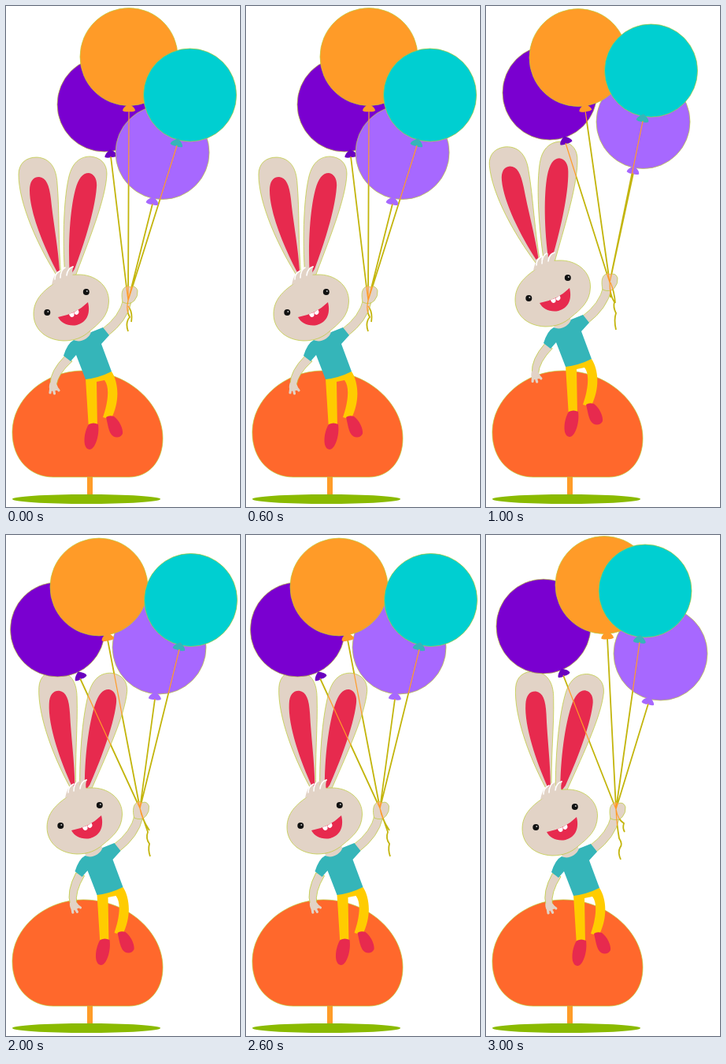
Write an HTML page that moves like this. It is 297 px wide and 636 px high and loops after 4000 ms.

```html
<!DOCTYPE html>
<html lang="en">
<head>
<meta charset="utf-8">
<title>Rabbit with balloons</title>
<style>
  html, body { margin: 0; width: 100%; height: 100%; overflow: hidden; background: #fff; }
  svg { display: block; width: 100%; height: 100%; }
  .pose { opacity: 0; animation: show 4s step-end infinite; }
  @keyframes show { 0% { opacity: 1; } 25%, 100% { opacity: 0; } }
  .skin { fill: #e2d3c6; }
  .red { fill: #e72a4e; }
  .shirt { fill: #35b5b9; }
  .pants { fill: #ffcc00; }
  .rim { stroke: #bccb35; stroke-width: .7; }
  .fingers { fill: none; stroke: #e2d3c6; stroke-width: 3.2; stroke-linecap: round; }
  .hair { fill: none; stroke: #fff; stroke-width: 1.6; stroke-linecap: round; }
  .cord { fill: none; stroke: #c3b50c; stroke-width: 1.8; }
  .thin { fill: none; stroke: #ff9b28; stroke-width: 1.2; }
</style>
</head>
<body>
<svg viewBox="0 0 297 636" preserveAspectRatio="none">
  <defs>
    <g id="arm">
      <path class="skin rim" d="M75 444Q56 463 56 480L64 482Q66 467 84 451Z"/>
      <path class="skin" d="M56 478L64 480Q67 484 65 488L57 489Q53 485 56 478Z"/>
      <path class="fingers" d="M57 484L56 491M60 485L61.500 492M63 483L67 488"/>
    </g>
    <g id="body">
      <path class="skin rim" d="M122 410Q144 394 149 372L159 376Q154 400 129 419Z"/>
      <path class="skin rim" d="M148 376C146 366 147 360 151 357Q155 354 158 357Q164 354 167 361Q168 368 163 374Q157 380 148 376Z"/>
      <path class="skin" d="M84 420L106 410L110 420L92 430Z"/>
      <path class="pants" d="M101 473L134 464C143 478 145 502 133 525L123 522C128 508 133 485 125 475L115 477L116 537H105Z"/>
      <path class="red" d="M105 531Q111 528 117 531C119 545 113 563 106 563C96 562 99 540 105 531Z"/>
      <path class="red" d="M127 522Q131 519 137 521C144 526 149 537 148 543C145 549 137 549 133 543C130 538 129 530 127 522Z"/>
      <path class="shirt" d="M86 424C94 428 105 423 108 414L123 408L131 418L121 429L134 464Q118 472 101 474L89 443L82 451L73 444Q78 428 86 424Z"/>
    </g>
    <g id="ears">
      <path class="skin rim" d="M68 348C40 305 16 250 16 214C16 200 25 192 39 192C57 193 64 207 65 225C68 260 66 300 70 345Z"/>
      <path class="red" d="M65 338C48 306 30 262 30 234C30 223 34 217 42 217C51 218 55 227 57 245C60 275 66 305 68 336Z"/>
      <path class="skin rim" d="M75 346C71 290 74 240 80 216C84 200 93 191 107 191C120 192 128 200 128 213C127 245 104 300 87 346Z"/>
      <path class="red" d="M81 343C78 300 82 255 88 233C92 219 97 212 105 212C112 213 116 220 115 230C113 260 97 308 87 334Z"/>
    </g>
    <g id="head">
      <path class="skin rim" d="M90 341C113 340 131 355 130.500 375C130 394 118 403 106 413C97 421 87 425 73 425C50 424 35 410 35 391C35 373 47 362 60 353C69 345 78 341 90 341Z"/>
      <path class="skin" d="M58 354Q61 338 69 336L68 342Q71 333 77 332L76 339Q79 331 86 330Q83 336 85 343Z"/>
      <path class="hair" d="M62 347Q62 339 69 336M69 345Q69 335 75 332M77 342Q78 333 85 331"/>
      <path class="red" d="M66 395Q89 391 104 376C108 392 101 402 90 405C80 407 70 403 66 395Z"/>
      <path fill="#fff" d="M80 391L86 389Q88 394 84 395Q81 395 80 391ZM86.300 389L91.500 385.500Q94 390 90 392Q87 392 86.300 389Z"/>
      <g fill="#111"><circle cx="52.300" cy="389" r="4"/><circle cx="101.800" cy="363" r="4"/></g>
      <g fill="#bbb"><circle cx="53.300" cy="388" r="1"/><circle cx="102.800" cy="362" r="1"/></g>
    </g>
    <path id="knot" d="M0-6Q8-1 8 3Q5 5 0 4Q-5 5-8 3Q-8-1 0-6Z"/>
  </defs>
  <path fill="#ff9b28" d="M103 596H110V621H103Z"/>
  <ellipse cx="102" cy="626" rx="94" ry="6" fill="#8aba00"/>
  <path class="rim" fill="#ff682c" d="M8 541C8 500 48 463 98 463C154 463 199 504 199 549C199 578 181 598 156 598H60C31 598 8 576 8 541Z"/>
  <g id="stage"></g>
</svg>
<script>
// Back to front: radius, balloon colour, knot colour
const kinds = [
  [60, '#7a00d0', '#6a00c0'],
  [59.5, '#a768ff', '#a768ff'],
  [62, '#ff9b28', '#ff9b28'],
  [59, '#00cfd1', '#35b5b9']
];

// balloons: centre x, y and knot x, y; grip: where the cords meet
const poses = [
  { body: [0, 0], head: [0, 0], arm: 0, ears: 0, sink: 0, grip: [155, 374],
    balloons: [[125, 125, 133, 188], [198.5, 186, 186, 248], [156, 64.5, 156, 130], [233.5, 113, 217, 174]],
    tails: 'q-3 12 2 21q-6 7-2 18m0-32q6 7 4 20' },
  { body: [0, -16], head: [2, -18], arm: -4, ears: -4.8, sink: 0, grip: [157, 351],
    balloons: [[81, 110, 101, 171], [199.5, 147, 187, 209], [117, 65.5, 126, 130], [209.5, 82, 199, 143]],
    tails: 'q0 16 6 25q-2 6 2 14q-3 8 0 21m-8-60l1 19m0-19q5 12 6 26' },
  { body: [14.5, -17], head: [17, -20], arm: -17.5, ears: 3, sink: 3, grip: [170, 347],
    balloons: [[65.5, 120, 94, 179], [194.5, 142.5, 189, 205], [118, 66, 129, 130], [234.5, 82.5, 220, 142]],
    tails: 'q2 13 12 28m-12-28q5 16 10 30q-3 8 2 15q-2 8 1 16' },
  { body: [10, -16], head: [11, -18], arm: -16, ears: 3.6, sink: 2, grip: [165, 348],
    balloons: [[73, 116, 98, 175], [221.5, 150.5, 206, 211], [150, 63.5, 154, 128], [202, 71, 195, 133]],
    tails: 'q2 13 10 18q-2 6 1 11m-11-29q1 20 4 37q5 8 1 12q-3 6 1 15' }
];

const use = (id, move) => `<use href="#${id}" transform="${move}"/>`;
const shift = ([x, y]) => `translate(${x} ${y})`;

function balloon([x, y, kx, ky], i) {
  const [r, fill, tie] = kinds[i];
  const turn = Math.atan2(x - kx, ky - y) * 180 / Math.PI;
  return `<circle class="rim" cx="${x}" cy="${y}" r="${r}" fill="${fill}"/>` +
    `<g fill="${tie}">${use('knot', `${shift([kx, ky])} rotate(${turn})`)}</g>`;
}

function draw(p, i) {
  const cords = p.balloons.map(([, , x, y]) => `M${x} ${y + 3}L${p.grip}`).join('') + `M${p.grip}${p.tails}`;
  const rabbit =
    use('arm', `${shift(p.body)} rotate(${p.arm} 80 447)`) +
    use('body', shift(p.body)) +
    use('ears', `${shift([p.head[0], p.head[1] + p.sink])} rotate(${p.ears} 88 380)`) +
    use('head', shift(p.head));
  // Cords turn thin and orange wherever they cross something
  return `<g class="pose" style="animation-delay:${i - 4}s">
    <mask id="over${i}" maskUnits="userSpaceOnUse" x="0" y="0" width="297" height="636" style="mask-type:alpha">
      <use href="#solid${i}"/></mask>
    <path class="cord" d="${cords}"/>
    <g id="solid${i}">${rabbit}${p.balloons.map(balloon).join('')}</g>
    <g mask="url(#over${i})"><path class="thin" d="${cords}"/></g>
  </g>`;
}

document.getElementById('stage').innerHTML = poses.map(draw).join('');
</script>
</body>
</html>
```
